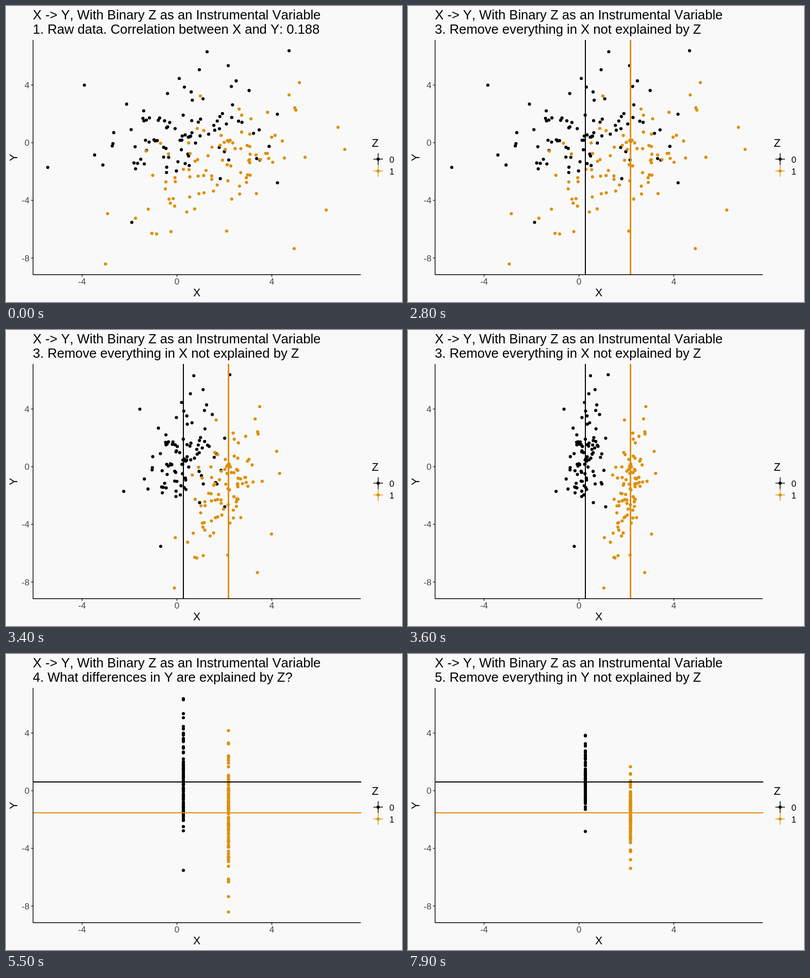
Recreate the animation shown at these times as an HTML page with a canvas. Size 768 by 576 pixels, loop 8000 ms.

```html
<!DOCTYPE html>
<html lang="en">
<head>
<meta charset="utf-8">
<title>Instrumental variable</title>
<style>
html, body { margin: 0; overflow: hidden; background: #f9f9f9; }
canvas { display: block; width: 768px; height: 576px; }
</style>
</head>
<body>
<canvas id="stage" width="768" height="576"></canvas>
<script>
const ctx = document.getElementById('stage').getContext('2d');
const LOOP = 8000, STEP = 100, MOVE_STEPS = 13, GROUP_SIZE = 98;
const BLACK = '#000', ORANGE = '#de8f0b';

// Captions with their start times
const captions = [
  [0, '1. Raw data. Correlation between X and Y: 0.188'],
  [500, '2. What differences in X are explained by Z?'],
  [2800, '3. Remove everything in X not explained by Z'],
  [5100, '4. What differences in Y are explained by Z?'],
  [7400, '5. Remove everything in Y not explained by Z']
];

let seed = 48271;
const random = () => (seed = seed * 16807 % 2147483647) / 2147483647;
const spread = () => random() + random() - 1;

// A sloped random cloud around (x, y), plus its few extreme points
function scatter({ x, y, w, h, slope }, extremes) {
  const points = [...extremes];
  while (points.length < GROUP_SIZE) {
    const dx = spread() * w;
    points.push([x + dx, y + slope * dx + spread() * h]);
  }
  return points;
}

const groups = [
  {
    color: BLACK, meanX: 344, meanY: 249, lineWidth: 2,
    points: scatter({ x: 338, y: 255, w: 200, h: 105, slope: -0.15 }, [
      [81, 314], [152, 154], [390, 89], [549, 87], [431, 116],
      [375, 124], [336, 141], [526.5, 344], [244, 421]
    ])
  },
  {
    color: ORANGE, meanX: 431.5, meanY: 309, lineWidth: 3,
    points: scatter({ x: 428, y: 306, w: 205, h: 110, slope: -0.4 }, [
      [193, 502], [197, 404], [320, 439], [428, 438], [559, 472], [621, 397],
      [657, 279], [644, 236], [569, 149], [549, 173], [377, 175]
    ])
  }
];

function line(x1, y1, x2, y2, color, width) {
  ctx.strokeStyle = color;
  ctx.lineWidth = width;
  ctx.beginPath();
  ctx.moveTo(x1, y1);
  ctx.lineTo(x2, y2);
  ctx.stroke();
}

function dot(x, y, color) {
  ctx.fillStyle = color;
  ctx.beginPath();
  ctx.arc(x, y, 3.1, 0, 2 * Math.PI);
  ctx.fill();
}

function text(str, x, y, size, align = 'left', color = BLACK) {
  ctx.font = `${size}px "Liberation Sans", Arial, sans-serif`;
  ctx.fontKerning = 'none';
  ctx.textAlign = align;
  ctx.fillStyle = color;
  ctx.fillText(str, x, y);
}

function drawAxes() {
  for (let v = -4; v <= 4; v += 4) {
    const x = 331.5 + v * 46;
    line(x, 523, x, 527, '#222', 1.4);
    text(v, x, 542, 17.07, 'center', '#444');
  }
  for (let v = -8; v <= 4; v += 4) {
    const y = 266 - v * 28.05;
    line(48.5, y, 52.5, y, '#222', 1.4);
    text(v, 45.5, y + 6.2, 17.07, 'right', '#444');
  }
  line(52.5, 66, 52.5, 523, BLACK, 1.4);
  line(52, 522.8, 688, 522.8, BLACK, 1.4);
  text('X', 370, 565, 21.33, 'center');
  ctx.save();
  ctx.translate(22, 295);
  ctx.rotate(-Math.PI / 2);
  text('Y', 0, 0, 21.33, 'center');
  ctx.restore();
}

function drawLegend() {
  text('Z', 709.5, 274, 21.33);
  groups.forEach(({ color }, i) => {
    const y = 298 + i * 23;
    line(712.5, y, 731, y, color, 1.4);
    line(721.7, y - 11.5, 721.7, y + 11.5, color, 1.4);
    dot(721.7, y, color);
    text(i, 743.5, y + 7, 17.07);
  });
}

// Sine ease in and out, moving once per step
function progress(t, start) {
  const p = Math.min(1, Math.max(0, (t - start) / STEP / MOVE_STEPS));
  return (1 - Math.cos(Math.PI * p)) / 2;
}

function draw(now) {
  const t = Math.floor(now % LOOP / STEP) * STEP;
  const px = progress(t, 2700), py = progress(t, 7300);

  ctx.fillStyle = '#f9f9f9';
  ctx.fillRect(0, 0, 768, 576);
  for (const { points, color, meanX, meanY } of groups)
    for (const [x, y] of points)
      dot(x + (meanX - x) * px, y + (meanY - y) * py, color);

  for (const { color, meanX, meanY, lineWidth } of groups) {
    if (t >= 900 && t < 5100) line(meanX, 66, meanX, 523, color, lineWidth);
    if (t >= 5500) line(53, meanY, 689, meanY, color, 2);
  }

  drawAxes();
  drawLegend();
  text('X -> Y, With Binary Z as an Instrumental Variable', 52, 26, 25.6);
  text(captions.findLast(([start]) => t >= start)[1], 52, 54, 25.6);
}

const begin = performance.now();
(function tick() {
  draw(performance.now() - begin);
  requestAnimationFrame(tick);
})();
</script>
</body>
</html>
```
